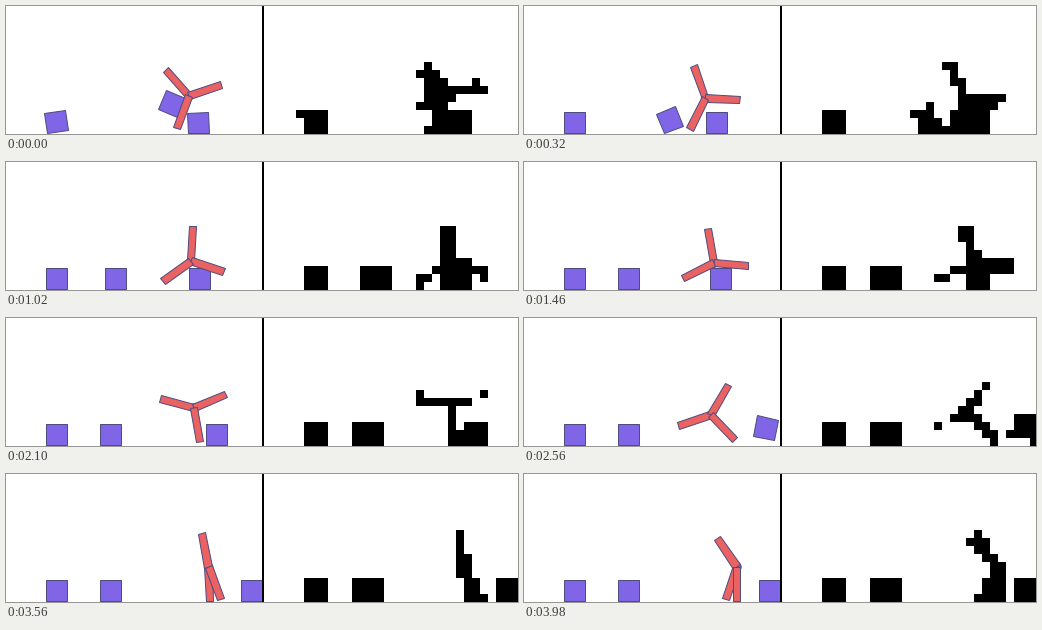
Animation of 512 by 128 pixels, one loop 4 s. Source, as a matplotlib script:

```python
import numpy as np
import matplotlib.pyplot as plt
from matplotlib.animation import FuncAnimation
from matplotlib.patches import Circle, Polygon, Rectangle

W, H, SPLIT, CELL = 512, 128, 258, 8
COLS, ROWS = 32, 16
FRAMES, STEP = 200, 20
FLOOR, BOX, LEG, LEG_W, HUB_R = 127.8, 10.4, 34.5, 7.4, 4.2
PURPLE = (128 / 255, 102 / 255, 230 / 255)
RED = (235 / 255, 98 / 255, 98 / 255)
EDGE = (77 / 255, 77 / 255, 128 / 255)

# Walker poses: time in ms, hub x, hub y, three leg angles
POSES = np.array([
    (0, 183, 90, -132, -18, 110),
    (640, 181, 95, -93, 18, 124),
    (1460, 190, 101, -100, 5, 153),
    (2100, 188, 90, -165, -23, 80),
    (2560, 187, 97, -198, -60, 46),
    (3160, 194, 94, -275, -82, 53),
    (3980, 213, 93, -251, -124, 90),
], float)
TIMES, VALUES = POSES[:, 0], POSES[:, 1:]
SLOPES = np.gradient(VALUES, TIMES, axis=0)


def pose(t):
    """Cubic Hermite curve through the walker poses."""
    i = int(np.clip(np.searchsorted(TIMES, t, "right") - 1, 0, len(TIMES) - 2))
    h = TIMES[i + 1] - TIMES[i]
    u = (t - TIMES[i]) / h
    return ((1 + 2 * u) * (1 - u) ** 2 * VALUES[i]
            + u * (1 - u) ** 2 * h * SLOPES[i]
            + u * u * (3 - 2 * u) * VALUES[i + 1]
            + u * u * (u - 1) * h * SLOPES[i + 1])


def ramp(t, start, length):
    return min(max((t - start) / length, 0), 1)


def rect(x0, x1, half):
    return np.array([(x0, -half), (x1, -half), (x1, half), (x0, half)])


def place(local, x, y, deg):
    c, s = np.cos(np.radians(deg)), np.sin(np.radians(deg))
    return local @ np.array([[c, s], [-s, c]]) + (x, y)


def resting(x, deg, y=H):
    """Box at height y, or standing on the floor if that is higher."""
    a = np.radians(deg)
    rest = FLOOR - BOX * (abs(np.cos(a)) + abs(np.sin(a)))
    return place(rect(-BOX, BOX, BOX), x, min(y, rest), deg)


def box_points(t):
    settle = 1 - ramp(t, 0, 140)
    roll = (1 - ramp(t, 0, 1200)) ** 1.28
    push = 4.5 * np.exp(0.00218 * (t - 1460))
    hop = np.sin(np.pi * ramp(t, 2300, 380))
    return [
        resting(51 - settle / 2, -9 * settle),
        resting(105 + 61 * roll, max(22 - 0.1375 * t, -90),
                98 + 30 * (t / 400) ** 2),
        resting(min(192.5 + push, 246), 14.3 * hop - 2 * settle)
        - (0, 6.2 * hop),
    ]


def walker_points(t):
    x, y, *angles = pose(t)
    reach = y + LEG * max(np.sin(np.radians(angles)))
    y -= max(reach - 129, 0)
    return (x, y), [place(rect(0, LEG, LEG_W / 2), x, y, a) for a in angles]


def stamp(grid, pts):
    """Scanline fill of a convex polygon snapped to whole cells."""
    q = np.floor(pts / CELL).astype(int)
    for y in range(max(q[:, 1].min(), 0), min(q[:, 1].max(), ROWS - 1) + 1):
        xs = []
        for (x0, y0), (x1, y1) in zip(q, np.roll(q, -1, axis=0)):
            if y0 == y1 == y:
                xs += [x0, x1]
            elif y0 != y1 and min(y0, y1) <= y <= max(y0, y1):
                xs.append(x0 + (x1 - x0) * (y - y0) / (y1 - y0))
        lo = int(np.floor(min(xs) + 0.5))
        hi = int(np.ceil(max(xs) - 0.5))
        grid[y, max(lo, 0):max(hi + 1, 0)] = 0


fig = plt.figure(figsize=(W / 100, H / 100), dpi=100, facecolor="white")
ax = fig.add_axes([0, 0, 1, 1])
ax.axis("off")

style = dict(ec=EDGE, lw=0.72, joinstyle="miter", snap=False)
dummy = rect(0, 1, 1)
boxes = [ax.add_patch(Polygon(dummy, fc=PURPLE, zorder=2, **style))
         for _ in range(3)]
hub = ax.add_patch(Circle((0, 0), HUB_R, fc=PURPLE, zorder=3, **style))
legs = [ax.add_patch(Polygon(dummy, fc=RED, zorder=4, **style))
        for _ in range(3)]
view = ax.imshow(np.ones((ROWS, COLS)), cmap="gray", vmin=0, vmax=1,
                 extent=(SPLIT, SPLIT + COLS * CELL, H, 0), aspect="auto",
                 interpolation="nearest", zorder=5)
ax.add_patch(Rectangle((256, 0), 2, H, fc="black", lw=0, zorder=6))
ax.set_xlim(0, W)
ax.set_ylim(H, 0)


def update(n):
    t = n * STEP
    grid = np.ones((ROWS, COLS))
    hub.center, leg_pts = walker_points(t)
    for patch, pts in zip(boxes + legs, box_points(t) + leg_pts):
        patch.set_xy(np.floor(pts) + 0.5)
        stamp(grid, pts)
    view.set_data(grid)
    return [*boxes, hub, *legs, view]


anim = FuncAnimation(fig, update, frames=FRAMES, interval=STEP,
                     repeat=True, repeat_delay=0, blit=False)
plt.show()
```
